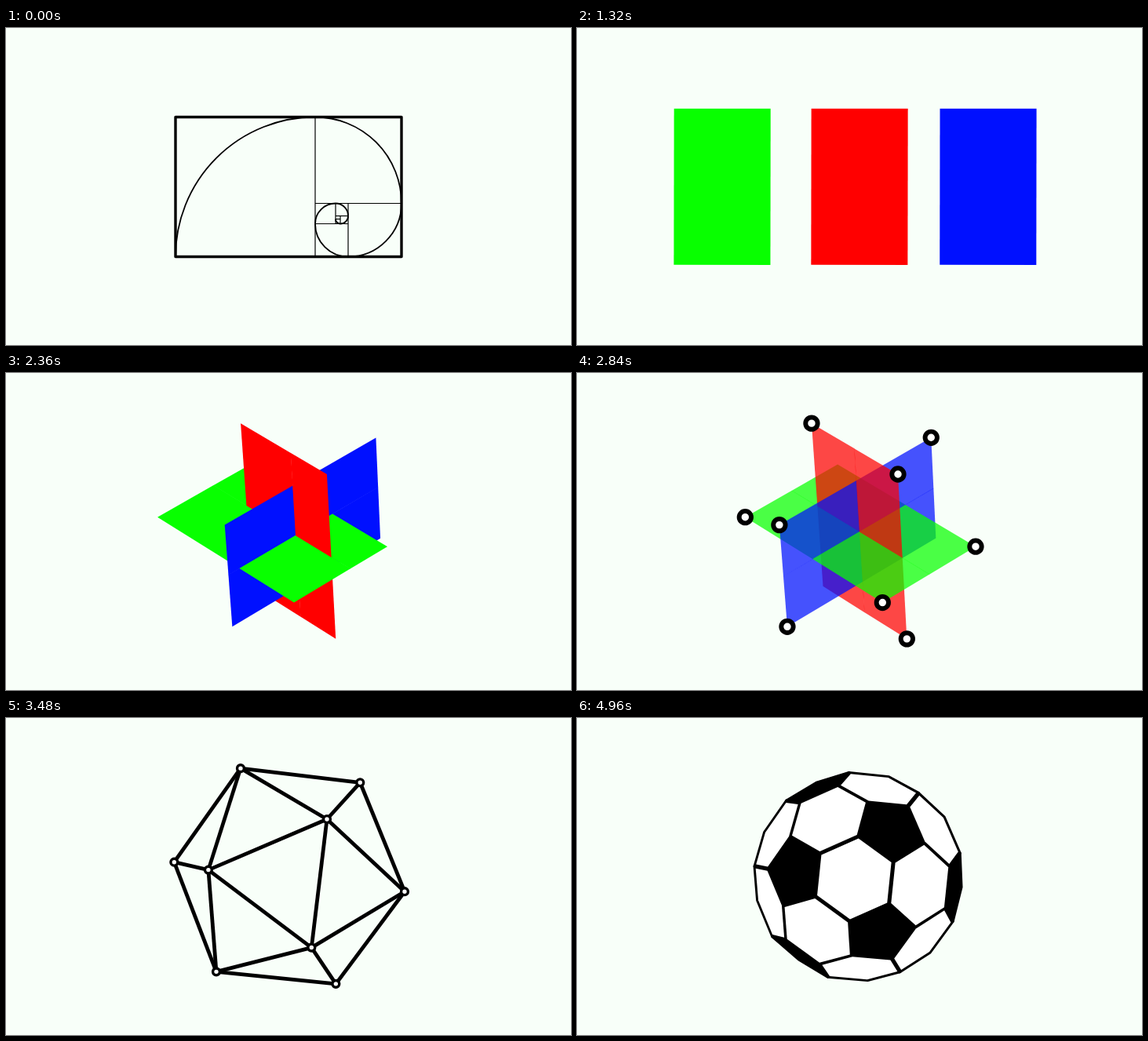
These frames come from a looping animation (720x404 px, 5 s). An HTML page with a canvas:

```html
<!DOCTYPE html>
<html lang="en">
<head>
<meta charset="utf-8">
<title>Golden rectangle to ball</title>
<style>
  html, body { margin: 0; width: 100%; height: 100%; overflow: hidden; background: #f8fff9; }
  canvas { display: block; }
</style>
</head>
<body>
<canvas id="stage" width="720" height="404"></canvas>
<script>
const ctx = document.getElementById('stage').getContext('2d');
const LOOP = 5000, CY = 202.3, EYE = 60, SPREAD = 170;
const PHI = (1 + Math.sqrt(5)) / 2, RAD = Math.PI / 180;

const clamp = x => Math.min(1, Math.max(0, x));
const mix = (a, b, p) => a + (b - a) * p;
const span = (t, a, b) => clamp((t - a) / (b - a));
const cubic = p => p < .5 ? 4 * p ** 3 : 1 - 4 * (1 - p) ** 3;
const ease = (t, a, b) => cubic(span(t, a, b));
const sum = (...vs) => [0, 1, 2].map(i => vs.reduce((s, v) => s + v[i], 0));
const times = (v, k) => v.map(x => x * k);

// n: normal axis, long and short: in-plane axes, turn: direction about the (1,1,1) diagonal
const CARDS = [
  { color: '#08ff00', side: -1.03, turn: -1, n: 1, long: 0, short: 2 },
  { color: '#0010ff', side: .965, turn: 1, n: 0, long: 2, short: 1 },
  { color: '#ff0000', side: 0, turn: 0, n: 2, long: 1, short: 0 }
];

// Poses the view moves through: yaw, pitch, roll, unit, centre x
const START = [0, 0, 90, 89, 360];
const MOVES = [
  { from: 870, to: 1350, pose: [0, 0, 0, 61.5, 360] },
  { from: 1350, to: 2000, pose: [55.6, 26.6, 0, 61.5, 360] },
  { from: 2030, to: 2400, pose: [49.6, 36.4, -3.56, 80.3, 360] },
  { from: 3900, to: 4450, pose: [48, 36.4, -3.56, 80.6, 358.5] }
];

function viewAt(t) {
  const pose = MOVES.reduce((now, m) =>
    now.map((v, i) => mix(v, m.pose[i], ease(t, m.from, m.to))), START);
  const [yaw, pitch, roll] = pose.map(v => v * RAD);
  const [, , , unit, cx] = pose;
  const spread = SPREAD * (ease(t, 870, 1350) - ease(t, 2035, 2510));
  const [cy, sy, cp, sp, cr, sr] =
    [yaw, pitch, roll].flatMap(v => [Math.cos(v), Math.sin(v)]);
  const x = [cy, 0, sy], y = [sp * sy, cp, -sp * cy];
  const right = x.map((v, i) => cr * v - sr * y[i]);
  const down = x.map((v, i) => sr * v + cr * y[i]);
  const away = [-cp * sy, sp, cp * cy];
  const dot = (u, v) => u[0] * v[0] + u[1] * v[1] + u[2] * v[2];
  const project = v => {
    const k = unit * EYE / (EYE + dot(v, away));
    return [cx + dot(v, right) * k, CY + dot(v, down) * k];
  };
  return { right, away, project, depth: v => dot(v, away), shift: spread / unit };
}

function fill(points, color) {
  ctx.beginPath();
  points.forEach(([x, y]) => ctx.lineTo(x, y));
  ctx.closePath();
  ctx.fillStyle = color;
  ctx.fill();
}

function line(x1, y1, x2, y2, width) {
  ctx.lineWidth = width;
  ctx.beginPath();
  ctx.moveTo(x1, y1);
  ctx.lineTo(x2, y2);
  ctx.stroke();
}

function drawSpiral() {
  let x = 216, y = 113.5, w = 288, h = 178;
  ctx.strokeStyle = '#000';
  ctx.lineJoin = 'round';
  ctx.lineWidth = 3.4;
  ctx.strokeRect(x, y, w, h);
  for (let i = 0; i < 8; i++) {
    const s = Math.min(w, h), way = i % 4;
    const left = way === 2 ? x + w - s : x, top = way === 3 ? y + h - s : y;
    const ax = way === 0 || way === 3 ? left + s : left;
    const ay = way === 0 || way === 1 ? top + s : top;
    if (way === 0) { x += s; w -= s; line(x, y, x, y + h, 1.2); }
    if (way === 1) { y += s; h -= s; line(x, y, x + w, y, 1.2); }
    if (way === 2) { w -= s; line(x + w, y, x + w, y + h, 1.2); }
    if (way === 3) { h -= s; line(x, y + h, x + w, y + h, 1.2); }
    ctx.lineWidth = 1.8;
    ctx.beginPath();
    ctx.arc(ax, ay, s, (way + 2) * Math.PI / 2, (way + 3) * Math.PI / 2);
    ctx.stroke();
  }
}

// Rotation about the (1,1,1) diagonal; 120 degrees permutes the axes
function spin([x, y, z], angle) {
  const c = Math.cos(angle), s = Math.sin(angle) / Math.sqrt(3);
  const m = (x + y + z) / 3 * (1 - c);
  return [x * c + (z - y) * s + m, y * c + (x - z) * s + m, z * c + (y - x) * s + m];
}

function drawLooseCards(t, view) {
  const angle = ease(t, 1350, 1950) * 120 * RAD;
  for (const card of CARDS) {
    const at = times(view.right, card.side * view.shift);
    const corners = [[-1, -PHI, 0], [1, -PHI, 0], [1, PHI, 0], [-1, PHI, 0]];
    fill(corners.map(v => view.project(sum(spin(v, angle * card.turn), at))), card.color);
  }
}

// Cut a range at a plane; parts overlap by a hair to hide the seam
function cut(mid, half, plane) {
  const lo = mid - half, hi = mid + half, lap = .003;
  if (plane <= lo) return [[lo, hi, 1]];
  if (plane >= hi) return [[lo, hi, -1]];
  return [[lo, plane + lap, -1], [plane - lap, hi, 1]];
}

function drawCrossedCards(view, alpha) {
  const planes = [], pieces = [];
  const mids = CARDS.map(c => times(view.right, c.side * view.shift));
  CARDS.forEach((c, i) => planes[c.n] = mids[i][c.n]);
  CARDS.forEach((c, i) => {
    for (const [a, b, sl] of cut(mids[i][c.long], PHI, planes[c.long]))
      for (const [p, q, ss] of cut(mids[i][c.short], 1, planes[c.short])) {
        const point = (l, s) => {
          const v = [];
          v[c.n] = planes[c.n]; v[c.long] = l; v[c.short] = s;
          return view.project(v);
        };
        pieces.push({
          color: c.color,
          far: sl * view.away[c.long] + ss * view.away[c.short],
          points: [point(a, p), point(b, p), point(b, q), point(a, q)]
        });
      }
  });
  pieces.sort((a, b) => b.far - a.far);
  ctx.globalAlpha = alpha;
  for (const { color, points } of pieces) fill(points, color);
  ctx.globalAlpha = 1;
}

// Icosahedron from the corners of the three cards
const VERTS = [];
for (const c of CARDS)
  for (const l of [-PHI, PHI])
    for (const s of [-1, 1]) {
      const v = [0, 0, 0];
      v[c.long] = l; v[c.short] = s;
      VERTS.push(v);
    }
const near = (a, b) => Math.hypot(...VERTS[a].map((x, i) => x - VERTS[b][i])) < 2.1;
const FACES = [];
for (let a = 0; a < 12; a++)
  for (let b = a + 1; b < 12; b++)
    for (let c = b + 1; c < 12; c++)
      if (near(a, b) && near(b, c) && near(a, c)) FACES.push([a, b, c]);

const frontFaces = view =>
  FACES.filter(f => view.depth(sum(...f.map(i => VERTS[i]))) < 0);

// Edges grow from both ends until they meet
function drawEdges(view, faces, reach) {
  const edges = new Set(faces.flatMap(([a, b, c]) => [a * 12 + b, a * 12 + c, b * 12 + c]));
  ctx.strokeStyle = '#000';
  for (const e of edges) {
    const [x1, y1] = view.project(VERTS[Math.floor(e / 12)]);
    const [x2, y2] = view.project(VERTS[e % 12]);
    const k = reach / Math.hypot(x2 - x1, y2 - y1);
    if (k >= .5) {
      line(x1, y1, x2, y2, 4.8);
    } else {
      const dx = (x2 - x1) * k, dy = (y2 - y1) * k;
      line(x1, y1, x1 + dx, y1 + dy, 4.8);
      line(x2, y2, x2 - dx, y2 - dy, 4.8);
    }
  }
}

function nodeSize(t) {
  if (t < 2820) return 1.75 * Math.sin(span(t, 2690, 2820) * Math.PI / 2);
  if (t < 3560) return mix(1.75, 1, ease(t, 2820, 3000));
  if (t < 3680) return mix(1, 1.4, ease(t, 3560, 3680));
  return 1.4 * (1 - span(t, 3680, 3840) ** 2);
}

function drawNodes(view, faces, size) {
  if (size <= 0) return;
  ctx.strokeStyle = '#000';
  ctx.fillStyle = '#fff';
  ctx.lineWidth = 3.4 * size;
  for (const i of new Set(faces.flat())) {
    ctx.beginPath();
    ctx.arc(...view.project(VERTS[i]), 4.4 * size, 0, 2 * Math.PI);
    ctx.fill();
    ctx.stroke();
  }
}

// Hexagon left of a face: top is the largest corner weight, edge the smallest
function hexagon(view, face, top, edge) {
  const v = face.map(i => VERTS[i]);
  return [[0, 1, 2], [1, 0, 2], [1, 2, 0], [2, 1, 0], [2, 0, 1], [0, 2, 1]].map(([a, b, c]) =>
    view.project(sum(times(v[a], top), times(v[b], 1 - top - edge), times(v[c], edge))));
}

// Pentagon where a corner is cut off
function pentagon(view, i, c) {
  const ring = VERTS.map((_, j) => j).filter(j => j !== i && near(i, j))
    .map(j => view.project(VERTS[i].map((x, k) => mix(x, VERTS[j][k], c))));
  const [ox, oy] = [0, 1].map(k => ring.reduce((s, p) => s + p[k], 0) / 5);
  const angle = ([x, y]) => Math.atan2(y - oy, x - ox);
  return ring.sort((p, q) => angle(p) - angle(q));
}

function drawBall(t, view, faces) {
  const c = ease(t, 3900, 4450) / 3, inset = .02;
  const shapes = faces.map(f => hexagon(view, f, 1 - c, 0));
  VERTS.forEach((v, i) => {
    if (view.depth(v) < 0) shapes.push(pentagon(view, i, c));
  });
  ctx.strokeStyle = '#000';
  ctx.lineJoin = 'round';
  ctx.lineWidth = 4;
  for (const s of shapes) {
    fill(s, '#000');
    ctx.stroke();
  }
  const top = Math.min(1 - c - inset, 1 - 2 * inset);
  for (const f of faces) fill(hexagon(view, f, top, inset), '#fff');
}

function draw(t) {
  ctx.fillStyle = '#f8fff9';
  ctx.fillRect(0, 0, 720, 404);
  const view = viewAt(t);
  if (t < 870) {
    drawSpiral();
    ctx.globalAlpha = span(t, 580, 820);
    fill([[214.3, 111.8], [505.7, 111.8], [505.7, 293.2], [214.3, 293.2]], '#ff0000');
    ctx.globalAlpha = 1;
    return;
  }
  if (t < 2000) {
    drawLooseCards(t, view);
    return;
  }
  const faces = frontFaces(view);
  if (t >= 3900) {
    drawBall(t, view, faces);
    return;
  }
  if (t < 3460) {
    drawCrossedCards(view, mix(1, .72, span(t, 2510, 2700)) * (1 - span(t, 3260, 3460)));
  } else {
    ctx.globalAlpha = span(t, 3460, 3860);
    for (const f of faces) fill(f.map(i => view.project(VERTS[i])), '#fff');
    ctx.globalAlpha = 1;
  }
  if (t > 3090) drawEdges(view, faces, 86 * span(t, 3090, 3425));
  if (t > 2690) drawNodes(view, faces, nodeSize(t));
}

const start = performance.now();
function tick() {
  draw((performance.now() - start) % LOOP);
  requestAnimationFrame(tick);
}
tick();
</script>
</body>
</html>
```
